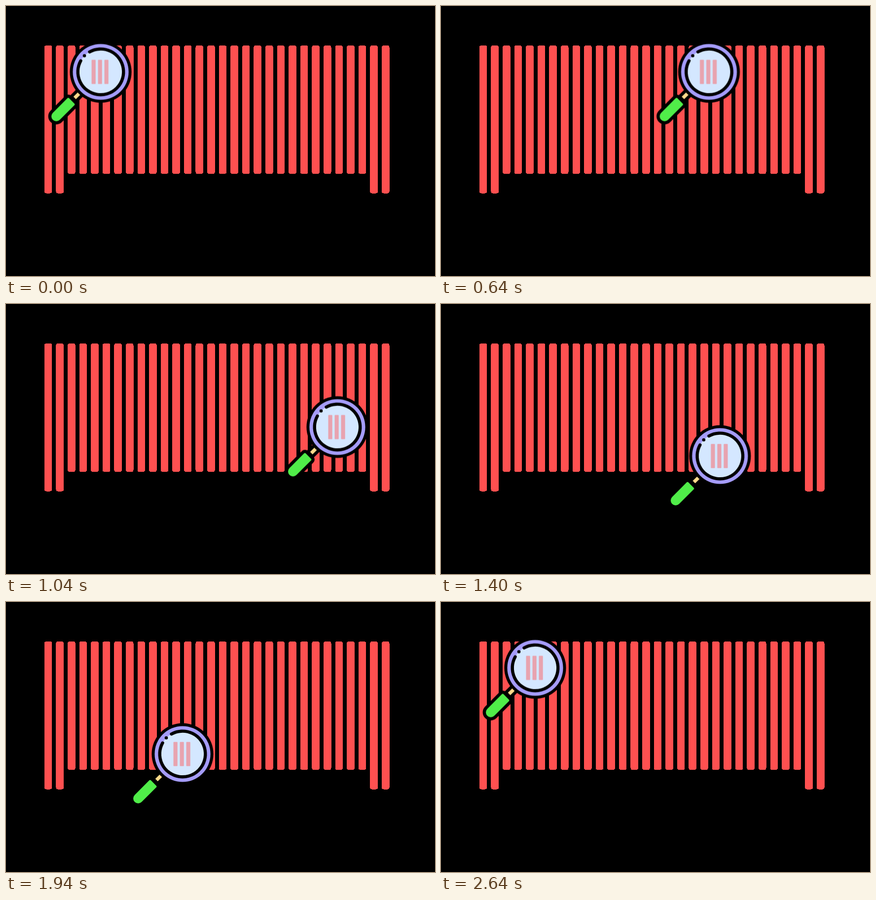
An HTML page that plays this animation: 870 px wide and 547 px high, repeating every 2660 ms.

```html
<!DOCTYPE html>
<html lang="en">
<head>
<meta charset="utf-8">
<title>Magnifier scan</title>
<style>
  html, body { margin: 0; width: 100%; height: 100%; overflow: hidden; background: #000; }
  svg { display: block; width: 870px; height: 547px; }
  #bars { fill: #ff5050; shape-rendering: crispEdges; }
  .edge { stroke: #000; stroke-width: 12.8; paint-order: stroke; }
  #glass { animation: scan 2660ms linear infinite; }
  @keyframes scan {
    0% { transform: translate(191.5px, 133.5px); }
    32.895% { transform: translate(672px, 133.5px); }
    42.293% { transform: translate(672px, 308px); }
    89.286% { transform: translate(191px, 308px); }
    98.684%, 100% { transform: translate(191px, 133.5px); }
  }
</style>
</head>
<body>
<svg viewBox="0 0 870 547">
  <g id="bars"></g>
  <g id="glass">
    <g transform="rotate(135)">
      <rect class="edge" x="60" y="-3.5" width="14.7" height="7" fill="#fedb8c"/>
      <path class="edge" fill="#50ed49" d="M127.3-10a10 10 0 0 1 0 20H85.1a2 2 0 0 1-2-2V-8a2 2 0 0 1 2-2z"/>
    </g>
    <circle r="62.6"/>
    <circle r="56.6" fill="#a59cfa"/>
    <circle r="46.3" fill="#d4e7ff"/>
    <path d="M-22.5-40.5A46.3 46.3 0 1 1-40.5-22.5" fill="none" stroke="#000" stroke-width="6.4" stroke-linecap="round"/>
    <circle cx="-33" cy="-32.7" r="3.3"/>
    <g fill="#e8a3af">
      <rect x="-18.5" y="-24.5" width="8.2" height="49" rx="1.2"/>
      <rect x="-5.5" y="-24.5" width="8.2" height="49" rx="1.2"/>
      <rect x="7.5" y="-24.5" width="8.2" height="49" rx="1.2"/>
    </g>
  </g>
</svg>
<script>
  const count = 30, pitch = 23.59;
  const bars = document.getElementById('bars');
  for (let i = 0; i < count; i++) {
    const bar = document.createElementNS(bars.namespaceURI, 'rect');
    const outer = i < 2 || i >= count - 2;
    const attrs = { x: 77.8 + i * pitch, y: 80, width: 15.6, height: outer ? 299.5 : 260, rx: 4 };
    for (const key in attrs) bar.setAttribute(key, attrs[key]);
    bars.append(bar);
  }
</script>
</body>
</html>
```
